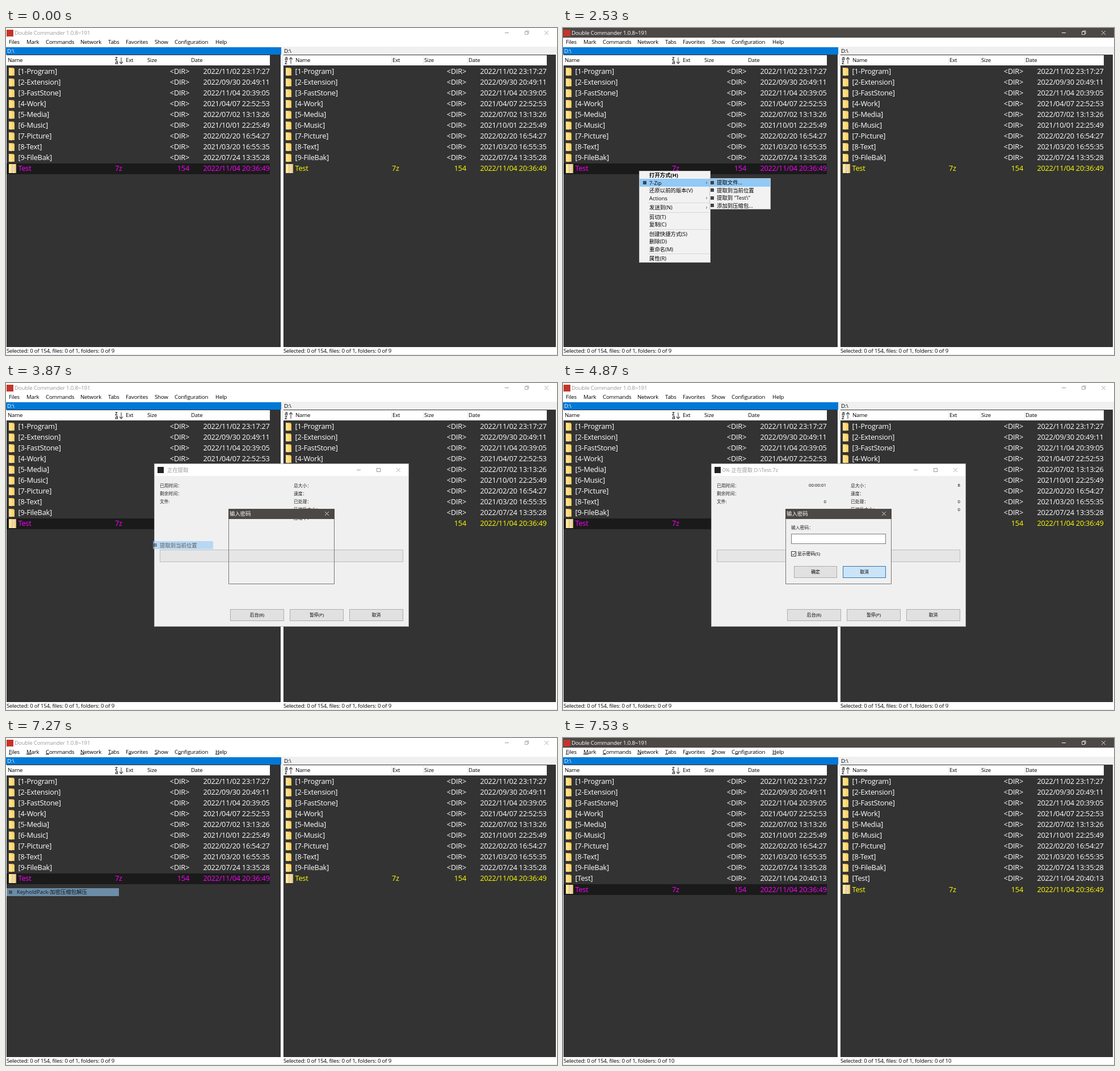
An HTML page for the animation above (8 s loop, 971 px wide and 577 px high).

```html
<!DOCTYPE html>
<html lang="zh-CN">
<head>
<meta charset="utf-8">
<title>File manager</title>
<style>
html, body { margin: 0; width: 100%; height: 100%; overflow: hidden; background: #fff; }
svg { display: block; width: 100%; height: 100%; }
text { font-family: 'Open Sans', 'Noto Sans CJK SC', 'Noto Sans CJK', sans-serif; white-space: pre; }
.ui { font-size: 9.7px; letter-spacing: -.02em; }
.file { font-size: 12.8px; letter-spacing: -.02em; }
.menu { font-size: 9.4px; }
.dlg { font-size: 7.8px; }
rect { shape-rendering: crispEdges; }
</style>
</head>
<body>
<svg id="stage" viewBox="0 0 971 577"></svg>
<script>
const LOOP = 8000, HOT = '#91c9f7', DARK = '#4c4846';

// Each step changes part of the state from its time on.
const steps = [
  [0, {}],
  [1070, { active: 1 }],
  [1530, { marked: 1 }],
  [1600, { marked: 0, context: -1 }],
  [1930, { context: 0 }],
  [2000, { context: 1, extract: -1 }],
  [2530, { extract: 0 }],
  [3400, { extract: 1 }],
  [3800, { context: null, extract: null, extractFade: 1 }],
  [3870, { active: 0, extractFade: .6, progress: 1, password: 1 }],
  [3930, { extractFade: .3, password: 2, caret: 1, button: 'ok' }],
  [4000, { extractFade: 0 }],
  [4070, { progress: 2 }],
  [4270, { button: 'hover' }],
  [4400, { button: 'pressed', caret: 0 }],
  [4800, { elapsed: 1 }],
  [5000, { active: 1, progress: 0, password: 0 }],
  [5670, { keys: 1 }],
  [5930, { files: -1 }],
  [6270, { files: 15 }],
  [6330, { files: 14 }],
  [6600, { files: 15 }],
  [7200, { files: null, filesFade: 1 }],
  [7270, { active: 0, filesFade: .6 }],
  [7330, { filesFade: .3 }],
  [7400, { filesFade: 0 }],
  [7470, { extracted: 1 }],
  [7530, { active: 1 }]
];

const folders = [
  ['1-Program', '2022/11/02 23:17:27'], ['2-Extension', '2022/09/30 20:49:11'],
  ['3-FastStone', '2022/11/04 20:39:05'], ['4-Work', '2021/04/07 22:52:53'],
  ['5-Media', '2022/07/02 13:13:26'], ['6-Music', '2021/10/01 22:25:49'],
  ['7-Picture', '2022/02/20 16:54:27'], ['8-Text', '2021/03/20 16:55:35'],
  ['9-FileBak', '2022/07/24 13:35:28']
];

// label, x, underline x, underline width
const menuBar = [
  ['Files', 5, 5, 5], ['Mark', 36, 36, 9], ['Commands', 70, 70, 6], ['Network', 131, 131, 7],
  ['Tabs', 180, 180, 5], ['Favorites', 211, 216, 5], ['Show', 262, 262, 5],
  ['Configuration', 297, 303, 6], ['Help', 369, 369, 7]
];

// Menu items: label, icon colour, has submenu; null is a separator.
const menus = {
  context: { x: 134, y: 252, w: 126, h: 162, textX: 152, iconX: 141, items: [
    ['打开方式(H)'], ['7-Zip', '#444', 1], ['还原以前的版本(V)'], ['Actions', '', 1], null,
    ['发送到(N)', '', 1], null, ['剪切(T)'], ['复制(C)'], null,
    ['创建快捷方式(S)'], ['删除(D)'], ['重命名(M)'], null, ['属性(R)']] },
  extract: { x: 258, y: 265, w: 108, h: 55, textX: 271, iconX: 260, items: [
    ['提取文件...', '#444'], ['提取到当前位置', '#444'],
    ['提取到 "Test\\"', '#444'], ['添加到压缩包...', '#444']] },
  files: { x: 0, y: 50, w: 200, h: 230, textX: 19, iconX: 5, items: [
    ['自定义批处理(S)', '#2b3a55', 1], ['OrdaTree 处理(R)', '#3aa53a'],
    ['压缩菜单(A)', '#c8862f', 1], ['解压菜单(E)', '#d08a3a', 1],
    ['PDFtk 处理(P)', '#3f8fd8'], ['图片处理(I)', '#b04030', 1],
    ['WinMerge 比较(M)', '#5a9bd0'], ['Vim 比较文件 (Ctrl+F2)', '#4a8f5a'], null,
    ['MakoDocs 新建文件夹 (Ctrl+F4)', '#c9965a'], ['MakoDocs 新建文件 (F4)', '#c9965a'], null,
    ['VeloDupe 复制 (Ctrl+F5)', '#2f2f86'], ['VeloDupe 同步 (Ctrl+F6)', '#2f2f86'], null,
    ['创建快捷方式 (Ctrl+Shift+F6)', '#3aa53a'], null,
    ['资源管理器 打开当前路径(E) (Shift+F9)', '#e0b040'], ['命令行窗口 打开当前路径', '#2b3a55'],
    ['KeyholdPack-加密压缩包解压', '#666']] }
};

const rect = (x, y, w, h, fill) => `<rect x="${x}" y="${y}" width="${w}" height="${h}" fill="${fill}"/>`;
const box = (x, y, w, h, fill, stroke) =>
  rect(x, y, w, h, stroke) + (fill ? rect(x + 1, y + 1, w - 2, h - 2, fill) : '');
const line = (d, color, width = 1) => `<path d="${d}" fill="none" stroke="${color}" stroke-width="${width}"/>`;
const shape = (d, fill) => `<path d="${d}" fill="${fill}"/>`;
const text = (x, y, s, cls, fill = '#000', anchor = 'start', extra = '') =>
  `<text x="${x}" y="${y}" class="${cls}" fill="${fill}" text-anchor="${anchor}" ${extra}>${s.replace(/</g, '&lt;')}</text>`;
const cross = (x, y, color, r = 3.5) =>
  line(`M${x - r} ${y - r}l${2 * r} ${2 * r}m0 ${-2 * r}l${-2 * r} ${2 * r}`, color, .8);
const dash = (x, y, color) => rect(x - 3.5, y, 7, 1, color);

function folderIcon(y) {
  return shape(`M5 ${y - 7}h8l2 2v12h-10z`, '#e8bb57') +
    shape(`M5 ${y - 7}l5 1.5v13l-5 -1z`, '#ffe08a') +
    shape(`M10 ${y - 5}h4.5v11.5h-4.5z`, '#ffd670');
}

function archiveIcon(y) {
  return rect(5, y - 8, 13, 16, '#e9c670') + rect(5, y - 8, 5, 16, '#ffe6a0') +
    rect(12, y - 8, 3, 16, '#f7f1df') + line(`M13.5 ${y - 8}v14`, '#77705c', 1).replace('/>', ' stroke-dasharray="1 1.5"/>');
}

function fileRow(i, name, ext, size, date, color, icon) {
  const y = 76.5 + i * 19.06, base = y + 4.4;
  return icon(Math.round(y)) + text(21.5, base, name, 'file', color) + text(192, base, ext, 'file', color) +
    text(323, base, size, 'file', color, 'end') + text(464.5, base, date, 'file', color, 'end');
}

function panel(left, s) {
  const list = s.extracted ? [...folders, ['Test', '2022/11/04 20:40:13']] : folders;
  const n = list.length, shift = left ? 0 : 488;
  const color = left ? (s.marked ? '#ff0000' : '#ff00ff') : '#ffff00';
  const heads = left ? [['Name', 3], ['Ext', 211], ['Size', 249], ['Date', 326]]
    : [['Name', 22], ['Ext', 193], ['Size', 249], ['Date', 327]];
  const sortX = left ? 192 : 3, letters = left ? 'za' : 'az';
  const arrow = left ? 'v11m-3 -3.5l3 3.5l3 -3.5' : 'v11m-3 -7.5l3 -3.5l3 3.5';
  let out = rect(0, 34, left ? 485 : 483, 13, left ? '#0078d7' : '#f0f0f0') +
    text(2, 44, 'D:\\', 'ui', left ? '#fff' : '#000') +
    rect(1, 47, left ? 483 : 480, 516, '#333') + rect(1, 48, 464, 18, '#fff');
  out += heads.map(([label, x]) => text(x, 60.3, label, 'ui')).join('');
  if (!left) out += [191, 247, 325].map(x => rect(x, 49, 1, 16, '#e5e5e5')).join('');
  out += [...letters].map((c, i) => text(sortX, 56.5 + i * 7, c, 'ui', '#444', 'start', 'font-weight="700"')).join('');
  out += line(`M${sortX + 11} 52${arrow}`, '#555', 1.2);
  if (left) out += rect(1, Math.round(67 + n * 19.06), 464, 19, '#1a1a1a');
  out += list.map(([name, date], i) => fileRow(i, `[${name}]`, '', '<DIR>', date, '#fff', folderIcon)).join('');
  out += fileRow(n, 'Test', '7z', '154', '2022/11/04 20:36:49', color, archiveIcon);
  const [bytes, count] = left && s.marked ? [154, 1] : [0, 0];
  out += text(1, 572.6, `Selected: ${bytes} of 154, files: ${count} of 1, folders: 0 of ${n}`, 'ui');
  return `<g transform="translate(${shift})">${out}</g>`;
}

function mainWindow(s) {
  const ink = s.active ? '#fff' : '#999';
  return rect(0, 0, 971, 577, '#fff') + rect(0, 0, 971, 17, s.active ? DARK : '#fff') +
    rect(1, 3, 12, 12, '#c3352b') + text(15, 12.3, 'Double Commander 1.0.8~191', 'ui', ink) +
    dash(882.5, 8, ink) + line('M914.5 6.5h5v5h-5zM916 6.5v-1.5h5v5h-1.5', ink, .8) + cross(952.5, 8.5, ink) +
    menuBar.map(([label, x, ux, w]) => text(x, 27.8, label, 'ui') + (s.keys ? rect(ux, 28, w, 1, '#000') : '')).join('') +
    rect(0, 33, 971, 1, '#f0f0f0') + rect(485, 34, 4, 529, '#f0f0f0') + rect(0, 576, 971, 1, '#e3e3e3') +
    panel(true, s) + panel(false, s);
}

function menuItem(m, [label, icon, sub], y, hot, bold) {
  const mid = Math.round(y);
  return (hot ? rect(m.x + 1, mid - 7, m.w - 2, 14, HOT) : '') +
    (icon ? rect(m.iconX, mid - 3, 6, 6, icon) : '') +
    text(m.textX, y + 3.4, label, 'menu', '#000', 'start', bold ? 'font-weight="700"' : '') +
    (sub ? line(`M${m.x + m.w - 8} ${mid - 2}l2 2l-2 2`, '#444', .8) : '');
}

// With fade set, only the chosen item remains on screen.
function menu(name, hot, fade) {
  const m = menus[name];
  let y = m.y + 8, index = 0, out = fade ? '' : box(m.x, m.y, m.w, m.h, '#f2f2f2', '#c4c4c4');
  for (const item of m.items) {
    if (!item) {
      if (!fade) out += rect(m.textX - 2, Math.round(y - 5.1), m.x + m.w - m.textX, 1, '#d5d5d5');
      y += 3.2;
      continue;
    }
    if (!fade || index === hot) out += menuItem(m, item, y, index === hot, name === 'context' && !index);
    index++;
    y += 13.4;
  }
  return fade ? `<g opacity="${fade}">${out}</g>` : out;
}

function button(x, y, w, label, fill = '#e1e1e1', stroke = '#adadad') {
  return box(x, y, w, 21, fill, stroke) + text(x + w / 2, y + 13.3, label, 'dlg', '#000', 'middle');
}

function progressDialog(s) {
  const ready = s.progress === 2, gray = '#999';
  const label = (x, row, t) => text(x, 183.5 + row * 14.3, t, 'dlg', '#222');
  const value = (x, row, t) => text(x, 183.2 + row * 14.3, t, 'dlg', '#000', 'end');
  let out = box(261, 142, 449, 288, '#f0f0f0', '#b5b5b5') + rect(262, 143, 447, 21, '#fff') +
    rect(267, 148, 11, 11, '#222') +
    text(ready ? 281 : 284, 156.8, ready ? '0% 正在提取 D:\\Test.7z' : '正在提取', 'menu', gray) +
    dash(621.5, 153, gray) + box(653, 150, 7, 7, '#fff', gray) + cross(691.5, 153.5, gray);
  out += ['已用时间：', '剩余时间：', '文件:'].map((t, i) => label(271, i, t)).join('');
  out += ['总大小：', '速度：', '已处理：', '压缩后大小：', '压缩率：'].map((t, i) => label(507, i, t)).join('');
  if (ready) out += value(464, 2, '0') + value(700, 0, '8') + value(700, 2, '0') + value(700, 3, '0');
  if (s.elapsed) out += value(464, 0, '00:00:01');
  return out + box(271, 294, 429, 22, '#e6e6e6', '#bcbcbc') +
    button(395, 399, 95, '后台(B)') + button(500, 399, 95, '暂停(P)') + button(605, 399, 95, '取消');
}

function passwordDialog(s) {
  const full = s.password === 2;
  const cancel = { hover: ['#e5f1fb', '#0078d7'], pressed: ['#cce4f7', '#2a76b4'] }[s.button] || [];
  let out = full ? rect(392, 222, 187, 133, '#f0f0f0') : '';
  out += line('M392.5 222v132.5h186v-132.5', '#777') + rect(392, 222, 187, 18, DARK) +
    text(394, 234.2, '输入密码', 'menu', '#fff') + cross(565.5, 230.5, '#fff');
  if (!full) return out;
  return out + text(402, 258.3, '输入密码：', 'dlg', '#222') +
    box(402, 266, 167, 18, '#fff', '#7a7a7a') + (s.caret ? rect(404, 268, 1, 13, '#000') : '') +
    box(402, 297, 9, 9, '#fff', '#333') + line('M404 301.5l2 2l3.5 -4', '#000') +
    text(413, 304.2, '显示密码(S)', 'dlg') +
    button(407, 323, 76, '确定', '#e1e1e1', s.button === 'pressed' ? '#adadad' : '#0078d7') +
    button(493, 323, 76, '取消', ...cancel);
}

function scene(s) {
  let out = mainWindow(s);
  if (s.progress) out += progressDialog(s);
  if (s.password) out += passwordDialog(s);
  for (const name in menus) if (s[name] != null) out += menu(name, s[name]);
  if (s.extractFade) out += menu('extract', 1, s.extractFade);
  if (s.filesFade) out += menu('files', 15, s.filesFade);
  return out;
}

const stage = document.getElementById('stage');
const start = performance.now();
let shown = -1;

function tick() {
  const t = Math.max(0, performance.now() - start) % LOOP;
  const current = steps.filter(([at]) => at <= t).length - 1;
  if (current !== shown) {
    shown = current;
    stage.innerHTML = scene(Object.assign({}, ...steps.slice(0, current + 1).map(step => step[1])));
  }
  requestAnimationFrame(tick);
}
tick();
</script>
</body>
</html>
```
